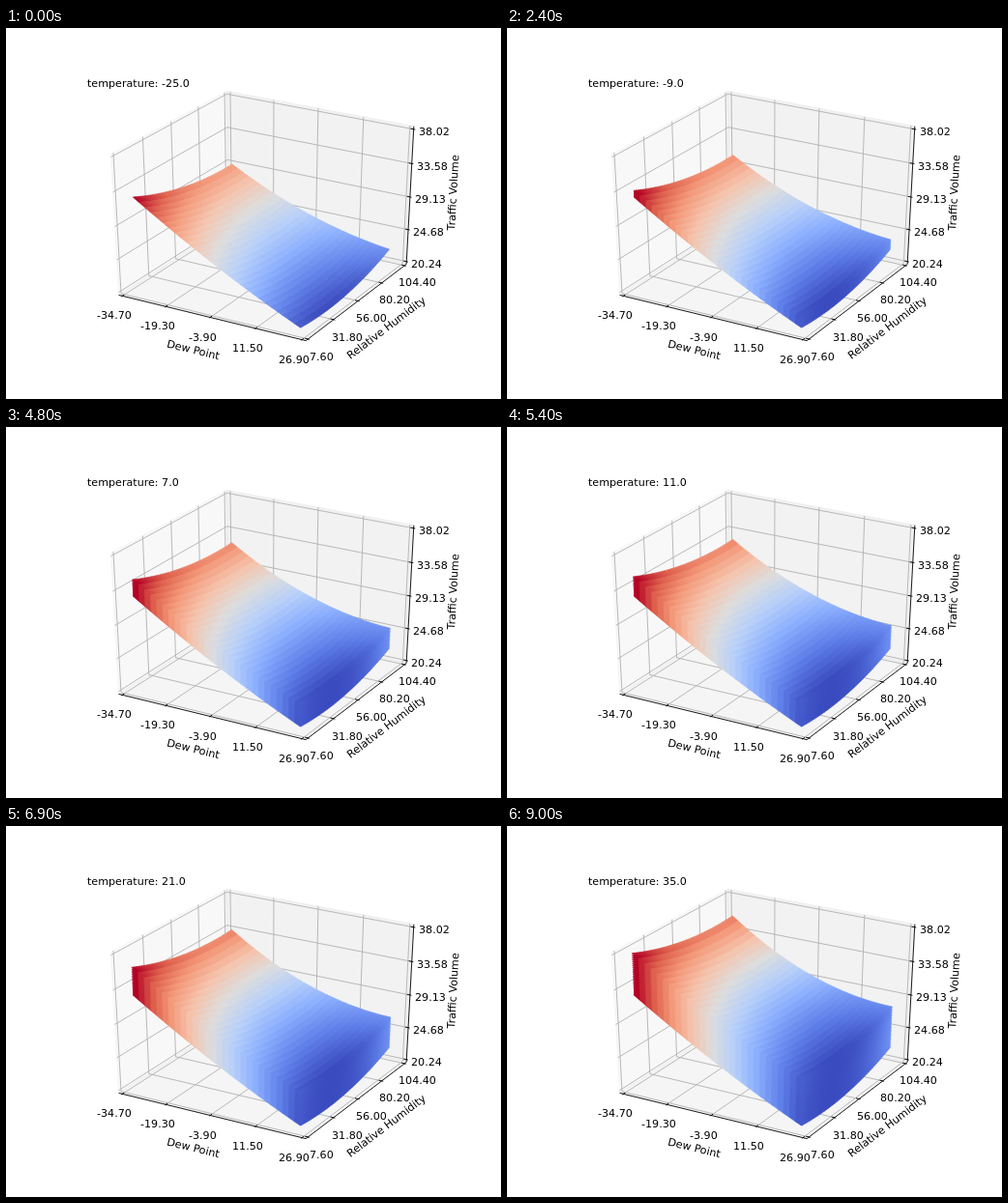
An HTML page with a canvas that plays this animation: 512 by 384 pixels, repeating every 9.3 s.

```html
<!DOCTYPE html>
<html lang="en">
<head>
<meta charset="utf-8">
<title>Traffic volume surface</title>
<style>
html, body { margin: 0; width: 100%; height: 100%; overflow: hidden; background: #fff; }
canvas { display: block; width: 512px; height: 384px; }
</style>
</head>
<body>
<canvas id="stage" width="512" height="384"></canvas>
<script>
const STEP = 300, STEPS = 31;
const NX = 28, NY = 44;
const FONT = '11.11px "DejaVu Sans", Verdana, sans-serif';
const LO = -1 / 48, HI = 1 + 1 / 48;
const LABEL_GAP = 0.0738, TITLE_GAP = 0.1605;

const ctx = document.getElementById('stage').getContext('2d');
const layers = document.createElement('canvas');
layers.width = 512;
layers.height = 384;
const lctx = layers.getContext('2d');

// Perspective camera around the unit cube: elevation 30, azimuth -60, distance 10.
const AZ = -Math.PI / 3, EL = Math.PI / 6;
const ca = Math.cos(AZ), sa = Math.sin(AZ), ce = Math.cos(EL), se = Math.sin(EL);
function project([x, y, z]) {
  x -= 0.5; y -= 0.5; z -= 0.5;
  const right = -sa * x + ca * y;
  const up = -se * (ca * x + sa * y) + ce * z;
  const w = 10 - (ce * (ca * x + sa * y) + se * z);
  return [
    64 + (right / w + 0.095) / 0.185 * 396.8,
    341.76 - (up / w + 0.095) / 0.185 * 295.68
  ];
}

function trace(c, points) {
  c.beginPath();
  points.forEach(p => c.lineTo(...project(p)));
}

function line(c, color, ...points) {
  trace(c, points);
  c.strokeStyle = color;
  c.lineWidth = 0.89;
  c.stroke();
}

function pane(c, shade, ...points) {
  trace(c, points);
  c.closePath();
  c.fillStyle = c.strokeStyle = `rgba(${shade},${shade},${shade},0.5)`;
  c.lineWidth = 1.1;
  c.fill();
  c.stroke();
}

function tickLabel(c, text, at) {
  const [x, y] = project(at);
  c.textAlign = 'left';
  c.fillText(text, Math.round(x - c.measureText(text).width / 2), Math.round(y + 8.4));
}

function axisTitle(c, text, at, from, to) {
  const [x, y] = project(at), [ax, ay] = project(from), [bx, by] = project(to);
  c.save();
  c.translate(x, y);
  c.rotate(Math.atan2(by - ay, bx - ax));
  c.textAlign = 'center';
  c.fillText(text, 0, 3.06);
  c.restore();
}

function drawAxes(c) {
  c.fillStyle = '#fff';
  c.fillRect(0, 0, 512, 384);
  pane(c, 242, [LO, LO, LO], [LO, HI, LO], [LO, HI, HI], [LO, LO, HI]);
  pane(c, 230, [LO, HI, LO], [HI, HI, LO], [HI, HI, HI], [LO, HI, HI]);
  pane(c, 236, [LO, LO, LO], [HI, LO, LO], [HI, HI, LO], [LO, HI, LO]);

  const ticks = [0, 0.25, 0.5, 0.75, 1];
  const grid = '#b0b0b0', ink = '#000';
  for (const t of ticks) {
    line(c, grid, [t, LO, LO], [t, HI, LO], [t, HI, HI]);
    line(c, grid, [HI, t, LO], [LO, t, LO], [LO, t, HI]);
    line(c, grid, [LO, LO, t], [LO, HI, t], [HI, HI, t]);
  }
  line(c, ink, [LO, LO, LO], [HI, LO, LO]);
  line(c, ink, [HI, LO, LO], [HI, HI, LO]);
  line(c, ink, [HI, HI, LO], [HI, HI, HI]);

  c.font = FONT;
  const out = 0.1 / 12, inn = 0.2 / 12;
  const near = LO - LABEL_GAP, far = HI + LABEL_GAP;
  for (const t of ticks) {
    line(c, ink, [t, LO - out, LO], [t, LO + inn, LO]);
    line(c, ink, [HI + out, t, LO], [HI - inn, t, LO]);
    line(c, ink, [HI + out, HI, t], [HI - inn, HI, t]);
    c.fillStyle = ink;
    tickLabel(c, (-34.7 + 61.6 * t).toFixed(2), [t, near, near]);
    tickLabel(c, (7.6 + 96.8 * t).toFixed(2), [far, t, near]);
    tickLabel(c, (20.24 + 17.78 * t).toFixed(2), [far, far, t]);
  }
  const n = LO - TITLE_GAP, f = HI + TITLE_GAP;
  axisTitle(c, 'Dew Point', [0.5, n, n], [LO, LO, LO], [HI, LO, LO]);
  axisTitle(c, 'Relative Humidity', [f, 0.5, n], [HI, LO, LO], [HI, HI, LO]);
  axisTitle(c, 'Traffic Volume', [f, f, 0.5], [HI, HI, LO], [HI, HI, HI]);
}

// Diverging blue-grey-red colour ramp.
const RAMP = [
  [59, 76, 192], [98, 130, 234], [141, 176, 254], [184, 208, 249], [221, 221, 221],
  [245, 196, 173], [244, 154, 123], [222, 96, 77], [180, 4, 38]
];
function ramp(v) {
  const p = Math.min(Math.max(v, 0), 1) * 8, i = Math.min(7, Math.floor(p));
  return `rgb(${RAMP[i].map((a, k) => Math.round(a + (RAMP[i + 1][k] - a) * (p - i)))})`;
}

const mix = (a, b, t) => a + (b - a) * t;

// Height at dew point x, humidity y and temperature t, all from 0 to 1.
function height(x, y, t) {
  const left = 0.701 + 0.134 * t + 0.165 * t * t;
  const back = 0.514 + 0.232 * t + 0.121 * t * t;
  const front = 0.015 + 0.26 * t + 0.08 * t * t;
  const right = 0.112 + 0.268 * t + 0.045 * t * t;
  const sagX = mix(0.03 + 0.01 * t, 0.065 + 0.045 * t, y);
  const sagY = mix(0.05, 0.06, x);
  return mix(mix(left, front, x), mix(back, right, x), y)
    - 4 * sagX * x * (1 - x) - 4 * sagY * y * (1 - y);
}

function drawLayer(c, t) {
  const inset = v => (0.05 + v) / 1.1;
  const h = [], pts = [];
  for (let j = 0; j <= NY; j++) {
    h[j] = [];
    pts[j] = [];
    for (let i = 0; i <= NX; i++) {
      const x = i / NX, y = j / NY;
      h[j][i] = height(x, y, t);
      pts[j][i] = project([inset(x), inset(y), h[j][i]]);
    }
  }
  const mean = (j, i) => (h[j][i] + h[j][i + 1] + h[j + 1][i] + h[j + 1][i + 1]) / 4;
  let lo = Infinity, hi = -Infinity;
  for (let j = 0; j < NY; j++) {
    for (let i = 0; i < NX; i++) {
      lo = Math.min(lo, mean(j, i));
      hi = Math.max(hi, mean(j, i));
    }
  }
  c.lineWidth = 0.6;
  c.lineJoin = 'round';
  for (let j = NY - 1; j >= 0; j--) {
    for (let i = 0; i < NX; i++) {
      c.fillStyle = c.strokeStyle = ramp((mean(j, i) - lo) / (hi - lo));
      c.beginPath();
      for (const p of [pts[j][i], pts[j][i + 1], pts[j + 1][i + 1], pts[j + 1][i]]) c.lineTo(...p);
      c.closePath();
      c.fill();
      c.stroke();
    }
  }
}

let drawn = -1;
function show(step) {
  if (step === drawn) return;
  if (step < drawn) drawn = -1;
  if (drawn < 0) drawAxes(lctx);
  while (drawn < step) drawLayer(lctx, ++drawn / (STEPS - 1));
  ctx.drawImage(layers, 0, 0);
  ctx.font = FONT;
  ctx.fillStyle = '#000';
  ctx.fillText('temperature: ' + (-25 + 2 * step).toFixed(1), 84, 61);
}

function tick() {
  show(Math.floor(performance.now() / STEP) % STEPS);
  requestAnimationFrame(tick);
}
tick();
</script>
</body>
</html>
```
